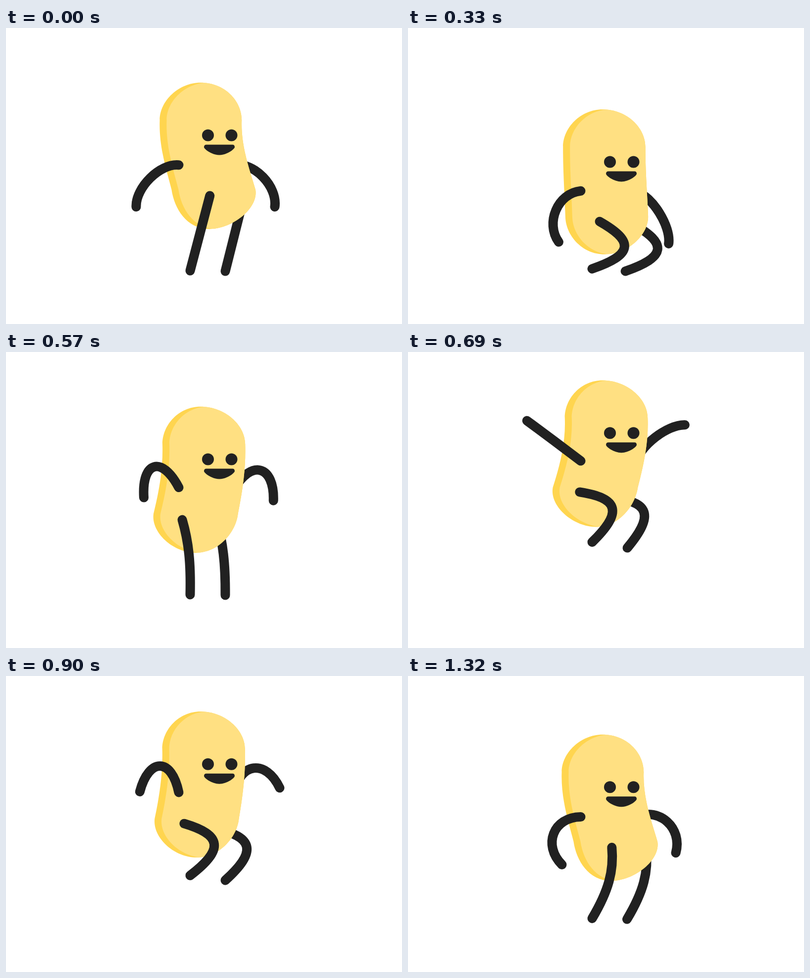
Recreate the animation shown at these times as an HTML page. Size 800 by 600 pixels, loop 1350 ms.

```html
<!DOCTYPE html>
<html lang="en">
<head>
<meta charset="utf-8">
<title>Jumping bean</title>
<style>
html, body { margin: 0; width: 100%; height: 100%; overflow: hidden; background: #fff; }
svg { display: block; width: 100vw; height: 100vh; }
.limb { fill: none; stroke: #212121; stroke-width: 19; stroke-linecap: round; }
</style>
</head>
<body>
<svg viewBox="0 0 800 600">
  <clipPath id="clip"><path id="edge"/></clipPath>
  <path id="armR" class="limb"/>
  <path id="legR" class="limb"/>
  <path id="shade" fill="#ffd54f"/>
  <g clip-path="url(#clip)"><path id="skin" fill="#ffe082" transform="translate(14 0)"/></g>
  <g id="face" fill="#212121">
    <circle cx="408" cy="107" r="12"/>
    <circle cx="455.5" cy="107" r="12"/>
    <path d="M405 126H457.5Q462 126 462 131C462 135 446 147 431 147C416 147 400 135 400 131Q400 126 405 126Z"/>
  </g>
  <path id="armL" class="limb"/>
  <path id="legL" class="limb"/>
</svg>
<script>
const LOOP = 1350, STEP = 30;
const LAUNCH = 570, PEAK = 763, LAND = 1035;
const ARM = { near: 50, reach: 136, bend: 75, a: 0.2, b: 0.78 };
const LEG = { near: 84, reach: 156, bend: 78, a: 0.3, b: 0.58 };

const el = id => document.getElementById(id);
const draw = (id, d) => el(id).setAttribute('d', d);

// 0 before a, 1 after b, smooth between
function ease(t, a, b) {
  const u = Math.min(1, Math.max(0, (t - a) / (b - a)));
  return u * u * (3 - 2 * u);
}

// Rises from a to b and falls back from b to c
const hump = (t, a, b, c) => t < b ? ease(t, a, b) : 1 - ease(t, b, c);

function path(start, ...curves) {
  const num = list => list.map(n => n.toFixed(2)).join(' ');
  return 'M' + num(start) + curves.map(c => 'C' + num(c)).join('');
}

// Bean with its top at y; the lower half is shifted sideways by s
function outline(y, s) {
  const left = 313.5 - 0.14 * s, right = 480 - 0.18 * s;
  const l = s > 0 ? 0.88 * s : s, r = s > 0 ? s : 0.8 * s;
  const bx = 396 + 0.7 * s, by = y + 293.5 + 0.15 * Math.abs(s);
  return path([393, y],
    [442, y, right, y + 37, right, y + 76],
    [right - 0.1 * s, y + 130, 483 + 0.5 * r, y + 180, 483 + r, y + 217],
    [483 + 1.3 * r, y + 255, bx + 46, by, bx, by],
    [bx - 46, by, 316 + 1.3 * l, y + 255, 316 + l, y + 217],
    [316 + 0.5 * l, y + 180, left - 0.1 * s, y + 130, left, y + 76],
    [left, y + 37, 349, y, 393, y]) + 'Z';
}

// The closer the two ends, the further the middle bulges to the given side
function limb(id, { near, reach, bend, a, b }, x, y, endX, endY, side = 1) {
  const dx = endX - x, dy = endY - y, d = Math.hypot(dx, dy);
  const stretch = Math.min(1, Math.max(0, (d - near) / (reach - near)));
  const k = side * bend * (1 - stretch ** 2.5) / d;
  const nx = k * dy, ny = -k * dx;
  draw(id, path([x, y],
    [x + dx * a + nx, y + dy * a + ny, x + dx * b + nx, y + dy * b + ny, endX, endY]));
}

function render(t) {
  const crouch = hump(t, 0, 300, LAUNCH);
  const squash = hump(t, LAND, 1225, LOOP);
  const jump = hump(t, LAUNCH, PEAK, LAND);
  const y = 110.5 + 56 * crouch + 54 * squash - 78.5 * jump;
  const s = 21 - 45 * hump(t, 0, 740, 1320);

  const body = outline(y + 0.3, s);
  for (const id of ['edge', 'shade', 'skin']) draw(id, body);
  el('face').setAttribute('transform', `translate(0 ${y.toFixed(2)})`);

  // Arms drop, flap up in the air, then the hands stay put on landing
  const drop = ease(t, 0, 430);
  const flap = hump(t, 420, PEAK, 1040);
  const settle = ease(t, PEAK, LAND);
  const hold = y - 54 * squash;
  limb('armL', ARM, 349, y + 165.5 + 0.08 * s,
    263 + 48 * drop - 80 * flap, hold + 252 + 20 * drop - 215 * flap, -1);
  limb('armR', ARM, 461, y + 167,
    543 - 19 * drop + 40 * flap + 17 * settle,
    hold + 252 + 24 * drop - 210 * flap - 28 * settle);

  // Feet leave the ground with the body and land a little later
  const lift = 157 * hump(t, LAUNCH, PEAK, 1060);
  const bent = crouch + squash;
  const footL = 492 - lift - 4 * bent, footR = 493 - 0.9 * lift;
  const gap = footR - footL;
  const hipX = 384 + 1.45 * s - 0.006 * s * s, hipY = y + 229.5 - 2 * bent - 4 * jump;
  limb('legL', LEG, hipX, hipY, 372, footL);
  limb('legR', LEG, hipX + 70 - 0.7 * gap, hipY + gap, 443 - 4 * bent, footR);
}

const begin = performance.now();
function tick() {
  const t = (performance.now() - begin) % LOOP;
  render(Math.floor(t / STEP) * STEP);
  requestAnimationFrame(tick);
}
tick();
</script>
</body>
</html>
```
